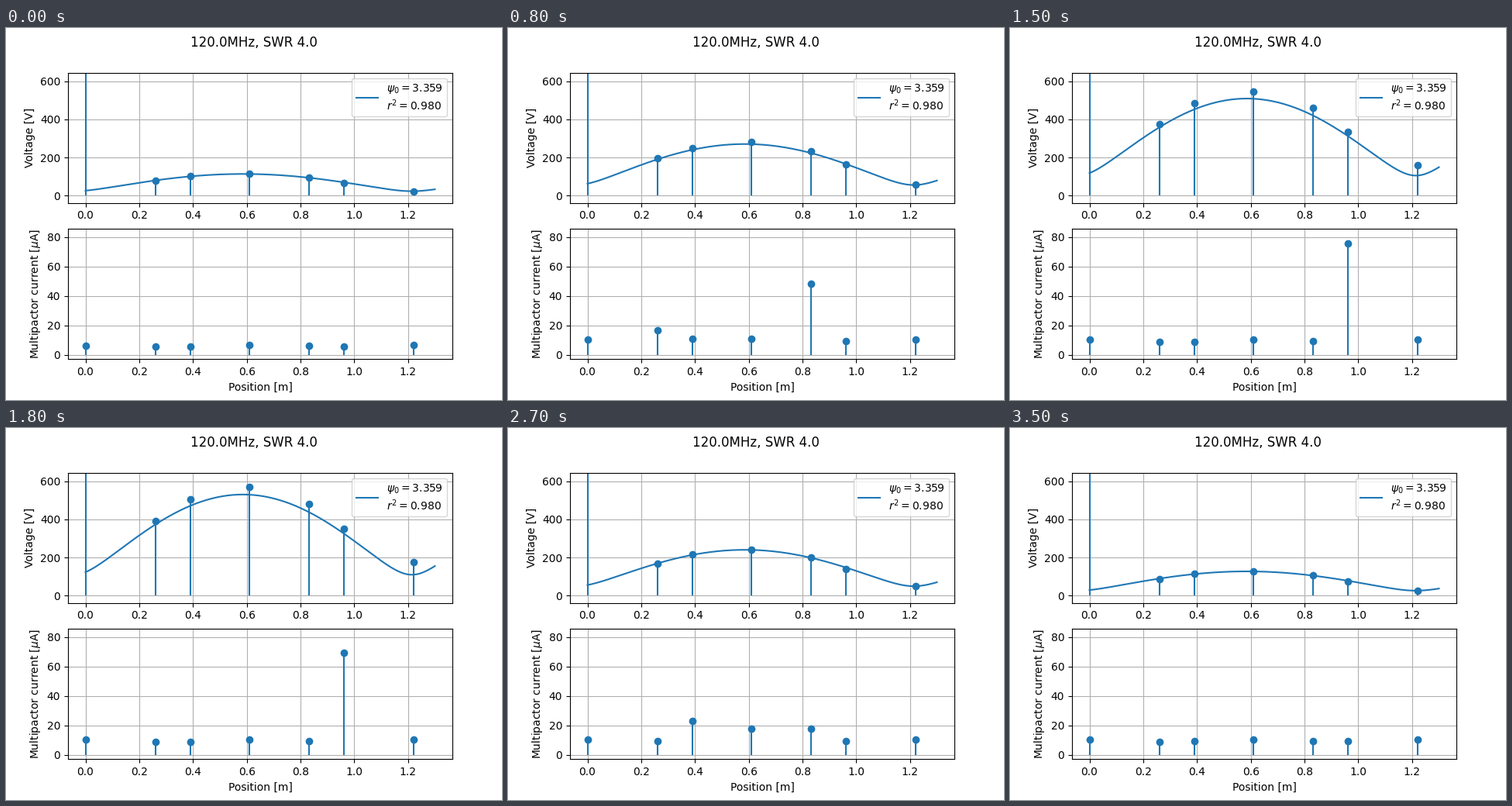
These frames come from a looping animation (640x480 px, 3570 ms). A matplotlib script:

```python
import numpy as np
import matplotlib.pyplot as plt
from matplotlib.animation import FuncAnimation

STEPS, LOOP_MS = 36, 3570
PSI, WAVE = 3.359, 4.995
PROBES = np.array([0, 0.26, 0.39, 0.61, 0.831, 0.96, 1.22])
GAIN = np.array([1, 0.98, 1, 1, 1, 0.94, 0.97])
LEAK = np.array([10.1, 9.0, 8.6, 10.5, 9.3, 9.1, 10.2])
OFF_SCALE = 1000

# Discharge band of each probe: peak current, centre voltage, half width
HEIGHT = np.array([0, 8.3, 16, 8, 42, 68, 0])
CENTRE = np.array([250, 210, 185, 210, 262, 305, 250])
WIDTH = np.array([50, 33, 55, 52, 55, 80, 50])


def power_ramp(step):
    """Antinode voltage: exponential rise, short plateau, exponential fall."""
    steps = [0, 8, 12, 16, 18, 23, 27, 30, 35]
    volts = [114, 282, 432, 588, 567, 388, 242, 172, 127.5]
    return np.exp(np.interp(step, steps, np.log(volts)))


def wave_shape(x):
    return np.sqrt(0.5215 + 0.4785 * np.cos(WAVE * x + PSI))


def fitted_wave(x, peak):
    """The fit reads a little low once the discharge sets in."""
    loss = 0.065 / (1 + np.exp(-(peak - 275) / 15))
    return peak * (1 - loss) * wave_shape(x)


def probe_voltages(peak):
    pickup = 0.11 * (PROBES / PROBES[-1]) ** 4 * (peak / 567) ** 5
    volts = peak * (GAIN * wave_shape(PROBES) + pickup)
    volts[0] = OFF_SCALE
    return volts


def probe_currents(step, volts):
    background = LEAK * (1 - 0.37 * np.exp(-step))
    return background + HEIGHT * np.exp(-((volts - CENTRE) / WIDTH) ** 4)


def add_stem(ax):
    return ax.stem(PROBES, np.zeros_like(PROBES), linefmt="C0-",
                   markerfmt="C0o", basefmt=" ")


def set_stem(stem, y):
    stem.markerline.set_ydata(y)
    stem.stemlines.set_segments([[(x, 0), (x, v)] for x, v in zip(PROBES, y)])


fig, (top, bottom) = plt.subplots(2, 1, figsize=(6.4, 4.8), dpi=100)
fig.suptitle("120.0MHz, SWR 4.0")

x = np.linspace(0, 1.3, 200)
curve, = top.plot(x, np.zeros_like(x),
                  label="$\\psi_0 = 3.359$\n$r^2 = 0.980$")
volt_stem, amp_stem = add_stem(top), add_stem(bottom)

for ax in (top, bottom):
    ax.set_xlim(-0.065, 1.365)
    ax.grid(True)
top.set_ylim(-37.35, 644.75)
bottom.set_ylim(-2.95, 85.65)
top.set_ylabel("Voltage [V]")
bottom.set_ylabel(r"Multipactor current [$\mu$A]")
bottom.set_xlabel("Position [m]")
top.legend(loc="upper right")


def update(step):
    peak = power_ramp(step)
    volts = probe_voltages(peak)
    curve.set_ydata(fitted_wave(x, peak))
    set_stem(volt_stem, volts)
    set_stem(amp_stem, probe_currents(step, volts))
    return curve,


anim = FuncAnimation(fig, update, frames=STEPS, interval=LOOP_MS / STEPS,
                     repeat=True, repeat_delay=0, blit=False)
plt.show()
```
